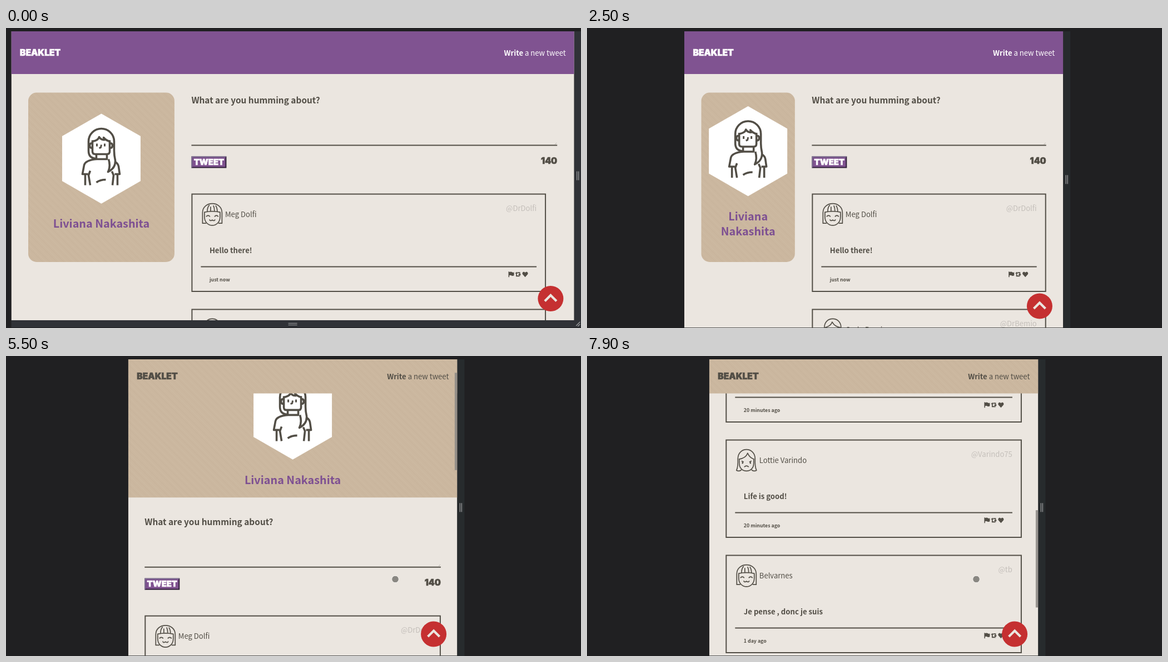
These frames come from a looping animation (1034x541 px, 8 s). An HTML page:

```html
<!DOCTYPE html>
<html lang="en">
<head>
<meta charset="utf-8">
<title>Responsive feed</title>
<style>
  html, body { margin: 0; width: 100%; height: 100%; overflow: hidden; background: #202022; }
  svg { display: block; width: 100%; height: 100%; }
  text { font-family: "Noto Sans CJK JP", "Noto Sans CJK SC", "Noto Sans CJK", "Open Sans", sans-serif; font-weight: 300; }
  .b { font-weight: 600; }
  .block { font-family: Inter, Roboto, sans-serif; font-weight: 900; stroke-width: .6; }
  .line { fill: none; stroke: #524e46; stroke-linecap: butt; stroke-linejoin: round; }
</style>
</head>
<body>
<svg viewBox="0 0 1034 541" xmlns="http://www.w3.org/2000/svg">
  <defs>
    <pattern id="sand" width="9" height="9" patternUnits="userSpaceOnUse" patternTransform="rotate(-45)">
      <rect width="9" height="9" fill="#cbb79f"/>
      <rect width="1" height="9" fill="#c5b098" opacity=".55"/>
      <rect x="4" width="1" height="9" fill="#d0bda6" opacity=".5"/>
    </pattern>
    <clipPath id="view"><rect id="viewRect" y="6"/></clipPath>

    <g id="woman">
      <path fill="#fff" d="M0-81 70.5-40.5V40.5L0 81.3-70.5 40.5V-40.5Z"/>
      <g class="line" stroke-width="3.6">
        <path d="M-10 0Q-23-1-23-14V-31A23 23 0 0 1 23-31V-14Q23-6 25 3Q26 17 12 24Q17 14 13 1"/>
        <path d="M-16-33V-13Q-16-8-11-8H10Q15-8 15-13V-33"/>
        <path d="M-16-31Q-5-33-4-39Q0-33 6-34L4-38Q9-32 16-31"/>
        <path d="M-16-28Q-21-28-21-23.500T-16-19M15-28Q20-28 20-23.500T15-19"/>
        <path d="M-8-27V-22M6-27V-22M0-25-1-20-4-19" stroke-width="3"/>
        <path d="M-9-8V1H10V-8"/>
        <path d="M-9 1Q-29 3-31 12L-34 28H-24M-20 22-23 30-20 48M-29 29V48"/>
        <path d="M25 6Q30 9 31 14L33 28H24M19 23 22 30 20 48M29 29V48"/>
        <path d="M-9 43Q-2 38 8 38"/>
      </g>
    </g>

    <g id="bob" class="line" stroke-width="1.7">
      <path d="M-11 16H-17.500V-3C-17.500-25 17.500-25 17.500-3V16H11"/>
      <path d="M-14-4V4C-14 25 14 25 14 4V-4Q0-7-14-4Z"/>
      <path d="M-9-5Q-9-13-5-17M-3-6V-14M4-6Q4-12 2-16M9-5Q9-12 6-16"/>
      <path d="M-11 4Q-7.500 0-4 4M4 4Q7.500 0 11 4M-5 9Q-4 13 0 10Q4 13 5 9"/>
    </g>
    <g id="grin" class="line" stroke-width="1.7">
      <path d="M-15 7V-4C-15-25 15-25 15-4V7"/>
      <path d="M-14 4C-13 25 13 25 14 4M-14-4Q-3-7-1-14Q4-5 14-4"/>
      <path d="M-15 4Q-23 9-19 20Q-12 19-11 13M15 4Q23 9 19 20Q12 19 11 13"/>
      <path d="M-10 2Q-7-2-4 2M4 2Q7-2 10 2"/>
      <path d="M-8 6H8Q9 14 4 14H-4Q-9 14-8 6ZM-8 10H8M-4 6V14M0 6V14M4 6V14"/>
    </g>
    <g id="frown" class="line" stroke-width="1.7">
      <path d="M-9 17Q-13 21-18 18Q-15 12-15.500-3C-15-25 15-25 15.500-3Q15 12 18 18Q13 21 9 17"/>
      <path d="M-13-2V5C-13 24 13 24 13 5V-2"/>
      <path d="M-14-2Q-1-4 2-13Q6-4 14-2"/>
      <path d="M-9 1-5 3M9 1 5 3M-4 12Q0 8 4 12"/>
      <path d="M-7 3V6M7 3V6" stroke-width="2.4"/>
    </g>

    <g id="icons" fill="#524e46">
      <path d="M-67.500-5H-66V-4Q-63-5.500-61-4T-57.500-4V2Q-60 3.500-62 2.200T-66 2V5H-67.500Z"/>
      <path d="M-53-4.500-50.500-1.500H-52.200V2H-48L-46.500 4H-54V-1.500H-55.700ZM-47.500 4-45-.5H-46.500V-4H-52L-50.500-2.200H-48.300V-.5H-50Z"/>
      <path d="M-37.500 5-42-0C-44-3-40-6.500-37.500-3C-35-6.500-31-3-33 0Z"/>
    </g>

    <g id="up">
      <circle r="23" fill="#c53031"/>
      <path d="M-10.500 4.500 0-6 10.500 4.500" fill="none" stroke="#ebe6e0" stroke-width="4.200"/>
    </g>
  </defs>
  <g id="frame"></g>
  <g id="page" clip-path="url(#view)"></g>
</svg>
<script>
const LOOP = 8000, STEP = 100, TOP = 6, MID = 515.6;
const INK = '#524e46', PAPER = '#ebe6e0', PURPLE = '#805391';
const $ = id => document.getElementById(id);

// [time, value] points
const EDGE = [[200, 9.5], [600, 13], [900, 25], [1100, 39], [1300, 87], [1500, 107], [2000, 127],
  [2300, 127], [2500, 175], [2700, 194], [3000, 206], [3500, 206], [4100, 219.8]];
const BOTTOM = [[200, 527], [1100, 531], [1300, 537], [2000, 540], [2500, 540.5]];
const SCROLL = [[5100, 0], [5600, 56], [5700, 56], [6100, 147], [6200, 147], [6300, 156], [6500, 255],
  [6800, 445], [7000, 539], [7400, 670], [7900, 795.5]];
const DOT_X = [[4600, 755], [4700, 718], [4800, 700]];
const DOT_Y = [[4600, 505], [4700, 435], [4800, 402.5]];

const TWEETS = [
  { face: 'bob', name: 'Meg Dolfi', tag: '@DrDolfi', lines: ['Hello there!'], age: 'just now' },
  { face: 'grin', name: 'Carla Bemio', tag: '@DrBemio', age: '20 minutes ago',
    lines: ['The more that you read, the more things you will know. The more that',
      'you learn, the more places you’ll go!'] },
  { face: 'frown', name: 'Lottie Varindo', tag: '@Varindo75', lines: ['Life is good!'], age: '20 minutes ago' },
  { face: 'bob', name: 'Belvarnes', tag: '@tb', lines: ['Je pense , donc je suis'], age: '1 day ago' }
];

function at(keys, t) {
  if (t <= keys[0][0]) return keys[0][1];
  for (let i = 1; i < keys.length; i++) {
    const [t0, v0] = keys[i - 1], [t1, v1] = keys[i];
    if (t <= t1) return v0 + (v1 - v0) * (t - t0) / (t1 - t0);
  }
  return keys[keys.length - 1][1];
}

const rect = (x, y, w, h, fill, more = '') =>
  `<rect x="${x}" y="${y}" width="${w}" height="${h}" fill="${fill}" ${more}/>`;
const use = (id, x, y) => `<use href="#${id}" x="${x}" y="${y}"/>`;
const text = (x, y, size, str, cls = '', fill = INK, anchor = 'start') =>
  `<text x="${x}" y="${y}" font-size="${size}" class="${cls}" fill="${fill}" text-anchor="${anchor}">${str}</text>`;
const block = (x, y, size, str, fill, anchor = 'start') =>
  `<g stroke="${fill}">${text(x, y, size, str, 'block', fill, anchor)}</g>`;
const path = (d, color, width) => `<path d="${d}" fill="none" stroke="${color}" stroke-width="${width}"/>`;

function devtools(L, R, H, lit) {
  const bar = lit ? '#303237' : '#272b2d', grip = '#a3a4a6';
  const y = (TOP + H) / 2, x = R + 6.5;
  return rect(0, 0, 1034, 541, '#202022') +
    rect(R, TOP, 13, H + 7, bar) + rect(L, H, R - L + 13, 13, bar) +
    path(`M${x - 1.5} ${y - 8}v16m3 0v-16`, grip, 1.2) +
    path(`M${MID - 8} ${H + 5.5}h16m0 3h-16`, grip, 1.2) +
    path(`M${x - 3} ${H + 10}l7-7m0 4l-4 4`, grip, 1.2);
}

function header(L, R, small) {
  const color = small ? INK : '#fff', y = small ? 41.7 : 49.5;
  return rect(L, TOP, R - L, small ? 61.5 : 77, small ? 'url(#sand)' : PURPLE) +
    block(L + 15.5, y, 15.6, 'BEAKLET', color) +
    text(R - 15, y, 13.1, '<tspan class="b">Write</tspan> a new tweet', '', color, 'end');
}

function profile(L, R, small, cardW, s) {
  const name = (x, y, str) => text(x, y, 19.8, str, 'b', '#7d4f92', 'middle');
  if (small) {
    return rect(L, TOP - s, R - L, 294, 'url(#sand)') + use('woman', MID, 150.2 - s) +
      name(MID, 275.5 - s, 'Liviana Nakashita');
  }
  const x = L + 30.5, cx = x + cardW / 2, wrap = cardW < 180;
  return rect(x, 116.5, cardW, 305.5, 'url(#sand)', 'rx="15"') +
    use('woman', cx, wrap ? 222 : 235.5) +
    (wrap ? name(cx, 346.5, 'Liviana') + name(cx, 373.5, 'Nakashita') : name(cx, 360, 'Liviana Nakashita'));
}

function compose(x, right, dy) {
  const y = 231.5 + dy;
  return text(x, 135.5 + dy, 15.4, 'What are you humming about?', 'b') +
    path(`M${x} ${211.5 + dy}H${right}`, INK, 2) +
    path(`M${right - 4} ${210 + dy}l3-3`, '#a5a19b', .8) +
    rect(x, y, 63, 21, '#2f1e39') +
    `<path d="M${x} ${y + 21}V${y}h63l-2 2v0h-59v17z" fill="#86759a"/>` +
    rect(x + 2, y + 2, 59, 17, PURPLE) +
    block(x + 31.5, y + 15.5, 14.8, 'TWEET', '#fff', 'middle') +
    block(right, 245 + dy, 15.6, '140', INK, 'end');
}

function tweet(tw, x, y, w) {
  const r = x + w, extra = (tw.lines.length - 1) * 17.5;
  return rect(x + 1, y + 1, w - 2, 175.5 + extra, 'none', `stroke="${INK}" stroke-width="2"`) +
    use(tw.face, x + 37.5, y + 37.7) +
    text(x + 60.5, y + 42.5, 13.1, tw.name) +
    text(r - 17, y + 31, 13.1, tw.tag, '', '#c4bfba', 'end') +
    tw.lines.map((l, i) => text(x + 32.5, y + 107.5 + i * 17.5, 13.17, l, 'b')).join('') +
    path(`M${x + 17} ${y + 132 + extra}H${r - 17}`, INK, 2) +
    text(x + 32.5, y + 158 + extra, 8.8, tw.age, 'b') +
    use('icons', r, y + 145.7 + extra);
}

function draw(t) {
  const L = at(EDGE, t), R = 2 * MID - L, W = R - L, H = at(BOTTOM, t), s = at(SCROLL, t);
  const small = W < 592;
  const cardW = (W - 92) * 2 / 7;
  const x = small ? L + 29.5 : L + 61 + cardW;
  const right = R - (small ? 29.5 : 30.5);
  const col = right - x;
  const boxW = small ? col : Math.min(col, .88 * col + 58.8);
  const dy = small ? 214 - s : 0;

  let feed = '', y = 298.5 + dy;
  for (const tw of TWEETS) {
    if (y < 541) feed += tweet(tw, x, y, boxW);
    y += 208 + (tw.lines.length - 1) * 17.5;
  }

  const view = $('viewRect');
  view.setAttribute('x', L);
  view.setAttribute('width', W);
  view.setAttribute('height', H - TOP);
  $('frame').innerHTML = devtools(L, R, H, t < 300);
  $('page').innerHTML = rect(L, TOP, W, H - TOP, PAPER) +
    profile(L, R, small, cardW, s) + compose(x, right, dy) + feed +
    header(L, R, small) + use('up', R - 42.3, H - 39) +
    (t >= 5200 ? rect(R - 4.5, 15.5 + .33 * s, 4.5, 175.5, '#8e8b87', 'opacity=".9"') : '') +
    (t >= 4600 ? `<circle cx="${at(DOT_X, t)}" cy="${at(DOT_Y, t)}" r="6.3" fill="#898782" stroke="#f6f4f1"/>` : '');
}

let last = -1;
const start = performance.now();
function tick() {
  const t = Math.floor((performance.now() - start) % LOOP / STEP) * STEP;
  if (t !== last) draw(last = t);
  requestAnimationFrame(tick);
}
tick();
</script>
</body>
</html>
```
